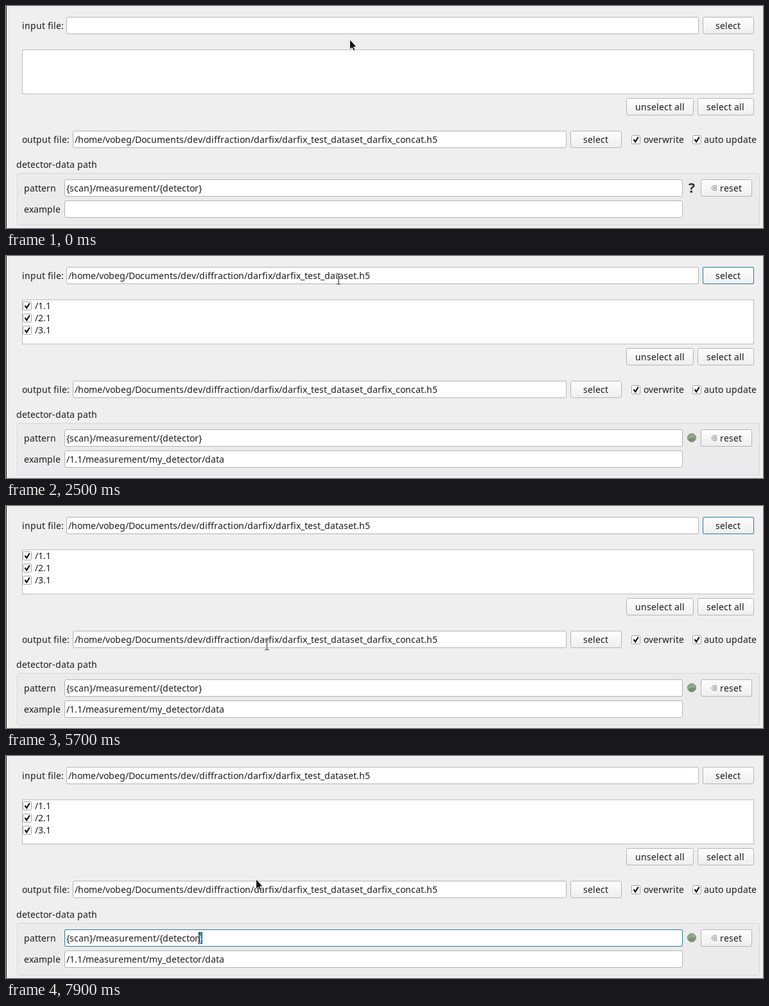
An HTML page that plays this animation: 1179 px wide and 347 px high, repeating every 8 s.

```html
<!DOCTYPE html>
<html lang="en">
<head>
<meta charset="utf-8">
<title>Concatenate scans</title>
<style>
  html, body { margin: 0; width: 100%; height: 100%; overflow: hidden; background: #efefef; }
  svg { display: block; }
  text {
    font: 14px "Noto Sans", "Open Sans", sans-serif;
    font-variant-ligatures: none;
    font-kerning: none;
    fill: #1c1c1c;
    white-space: pre;
  }
  .help { font-size: 21px; font-weight: 700; fill: #303030; }
  .edit { fill: #fff; stroke: #b4b4b4; }
  .button { fill: url(#face); stroke: #b4b4b4; }
  .list { fill: #fff; stroke: #bdbdbd; }
  .group { fill: #ebebeb; stroke: #d9d9d9; }
  .check { fill: #fff; stroke: #a2a2a2; }
  .tick { fill: none; stroke: #111; stroke-width: 2.2; }
  .focus { fill: none; stroke: #2b79a3; }
  .caret { fill: #111; }
  .popup { filter: drop-shadow(0 4px 6px rgba(0, 0, 0, .32)); }

  /* 1.25% of the loop is 100 ms */
  .anim { animation: 8s step-end infinite; opacity: 0; }
  .pasted { animation-name: pasted; }
  .offer { animation-name: offer; }
  .loaded { animation-name: loaded; }
  .unloaded { animation-name: unloaded; }
  .inputFocus { animation-name: inputFocus; }
  .selectFocus { animation-name: selectFocus; }
  .patternFocus { animation-name: patternFocus; }
  .caretEmpty { animation-name: caretEmpty; }
  .caretPath { animation-name: caretPath; }
  .caretPattern { animation-name: caretPattern; }
  .selection { animation-name: selection; }
  .ibeam { animation-name: ibeam; }
  .arrow { animation-name: arrow; }
  .pointer { animation: move 8s step-end infinite; }

  @keyframes pasted { 0% { opacity: 0 } 18.75%, 100% { opacity: 1 } }
  @keyframes offer { 0%, 31.25%, 100% { opacity: 0 } 18.75% { opacity: .7 } 20% { opacity: 1 } }
  @keyframes loaded { 0% { opacity: 0 } 31.25%, 100% { opacity: 1 } }
  @keyframes unloaded { 0% { opacity: 1 } 31.25%, 100% { opacity: 0 } }
  @keyframes inputFocus { 0%, 31.25%, 100% { opacity: 0 } 7.5% { opacity: .5 } 8.75% { opacity: 1 } }
  @keyframes selectFocus { 0%, 82.5%, 100% { opacity: 0 } 31.25% { opacity: 1 } 81.25% { opacity: .5 } }
  @keyframes patternFocus { 0% { opacity: 0 } 81.25% { opacity: .5 } 82.5%, 100% { opacity: 1 } }
  @keyframes caretEmpty { 0%, 13.75%, 100% { opacity: 0 } 7.5% { opacity: 1 } }
  @keyframes caretPath { 0%, 27.5%, 100% { opacity: 0 } 18.75% { opacity: 1 } }
  @keyframes caretPattern { 0%, 87.5%, 98.75%, 100% { opacity: 0 } 81.25%, 95% { opacity: 1 } }
  @keyframes selection { 0% { opacity: 0 } 98.75%, 100% { opacity: 1 } }
  @keyframes ibeam {
    0%, 18.75%, 50%, 72.5%, 85%, 100% { opacity: 0 }
    2.5%, 31.25%, 70%, 75% { opacity: 1 }
  }
  @keyframes arrow {
    0%, 18.75%, 50%, 72.5%, 85%, 100% { opacity: 1 }
    2.5%, 31.25%, 70%, 75% { opacity: 0 }
  }
  @keyframes move {
    0% { transform: translate(535px, 52px); animation-timing-function: steps(4) }
    5% { transform: translate(517px, 36px) }
    50% { transform: translate(501px, 53px) }
    56.25% { transform: translate(501px, 53px); animation-timing-function: steps(4) }
    61.25% { transform: translate(454px, 92px) }
    63.75% { transform: translate(454px, 92px); animation-timing-function: steps(9) }
    75% { transform: translate(381px, 279px); animation-timing-function: steps(3) }
    78.75% { transform: translate(379px, 284px) }
    83.75% { transform: translate(379px, 284px); animation-timing-function: steps(3) }
    87.5%, 100% { transform: translate(389px, 192px) }
  }
</style>
</head>
<body>
<svg id="stage" width="1179" height="347" viewBox="0 0 1179 347"></svg>
<script>
  const pen = document.createElement('canvas').getContext('2d');
  pen.font = '14px "Noto Sans", "Open Sans", sans-serif';

  const advance = c => Math.round(pen.measureText(c).width);

  // Every glyph starts on a whole pixel, as in a hinted toolkit.
  function label(x, y, str, style = '') {
    const xs = [...str].map(c => { const at = x; x += advance(c); return at; });
    return `<text x="${xs.join(' ')}" y="${y}" style="${style}">${str}</text>`;
  }

  const box = (kind, x, y, w, h, r = 2) =>
    `<rect class="${kind}" x="${x + .5}" y="${y + .5}" width="${w - 1}" height="${h - 1}" rx="${r}"/>`;

  const edit = (x, y, w, str = '') => box('edit', x, y, w, 27) + label(x + 3, y + 19, str);
  const button = (x, y, w, textX, str) => box('button', x, y, w, 27) + label(textX, y + 19, str);
  const focus = (x, y, w) => box('focus', x, y, w, 27);
  const caret = (x, y) => `<rect class="caret" x="${x}" y="${y}" width="1" height="19"/>`;
  const anim = (name, ...parts) => `<g class="anim ${name}">${parts.join('')}</g>`;

  const check = (x, y, textX, str) =>
    box('check', x, y, 14, 14, 1) +
    `<path class="tick" d="M${x + 3.5} ${y + 6.5}l2.7 3.8 4.6-7.6"/>` +
    label(textX, y + 12, str);

  const folder = '/home/vobeg/Documents/dev/diffraction/darfix/';
  const file = 'darfix_test_dataset';

  const icon =
    '<path d="M104.5 47.5h9l3 3v13h-12z" fill="#eef1f1" stroke="#cdd3d3"/>' +
    '<rect x="105" y="51" width="9" height="10" fill="#4d9dbd"/>' +
    '<path d="M105 61v-4l3-2 3 3 3-1v4z" fill="#4f8f86"/>' +
    '<circle cx="111" cy="54" r="1.5" fill="#d5e9ee"/>';

  const eraser =
    '<path d="M1098.5 284.5l3-4h5v8h-5z" fill="#d9d9d9" stroke="#a6a6a6"/>' +
    '<path d="M1102 283l3 3m0-3l-3 3" stroke="#8c8c8c"/>';

  const status =
    '<circle cx="1068" cy="284" r="6.5" fill="#91a98b" stroke="#7b8577"/>' +
    '<path d="M1062.5 286q5-3 11-1.500a5.600 5.600 0 0 1-11 1.500z" fill="#759070"/>';

  document.getElementById('stage').innerHTML = [
    `<defs><linearGradient id="face" x2="0" y2="1">
      <stop stop-color="#fefefe"/><stop offset="1" stop-color="#eeeeee"/>
    </linearGradient></defs>`,
    '<rect width="1179" height="347" fill="#efefef"/>',
    '<rect width="1" height="347" fill="#1a1a1a"/>',

    label(25, 36, 'input file:'),
    edit(94, 17, 985),
    button(1085, 17, 80, 1105, 'select'),
    box('list', 25, 68, 1140, 70, 0),
    button(966, 144, 105, 980, 'unselect all'),
    button(1077, 144, 88, 1091, 'select all'),

    label(25, 214, 'output file:'),
    edit(104, 195, 769, folder + file + '_darfix_concat.h5'),
    button(879, 195, 80, 899, 'select'),
    check(974, 202, 993, 'overwrite'),
    check(1069, 202, 1087, 'auto update'),

    label(16, 253, 'detector-data path'),
    box('group', 17, 261, 1157, 82),
    label(28, 290, 'pattern'),
    edit(91, 271, 963, '{scan}/measurement/{detector}'),
    button(1082, 271, 80, 1112, 'reset'),
    eraser,
    label(28, 323, 'example'),
    edit(91, 304, 963),

    anim('unloaded', '<text class="help" x="1063" y="292">?</text>'),
    anim('loaded',
      ...[1, 2, 3].map(n => check(26, 52 + 19 * n, 45, `/${n}.1`)),
      label(94, 323, '/1.1/measurement/my_detector/data'),
      status),

    anim('inputFocus', focus(94, 17, 985)),
    anim('selectFocus', focus(1085, 17, 80)),
    anim('patternFocus', focus(91, 271, 963)),
    anim('pasted', label(97, 36, folder + file + '.h5')),
    anim('caretEmpty', caret(97, 21)),
    anim('caretPath', caret(567, 21)),
    anim('caretPattern', caret(305, 275)),
    anim('selection',
      '<rect x="300" y="275" width="6" height="19" fill="#3184b3"/>',
      label(300, 290, '}', 'fill:#fff'),
      caret(300, 275)),

    anim('offer',
      '<rect class="popup" x="94.500" y="42.500" width="984" height="29" fill="#fff" stroke="#c4c4c4"/>',
      icon,
      label(128, 61, file + '.h5')),

    '<g class="pointer">',
    anim('arrow',
      '<path d="M.5 .5v15.500l3.500-3.200 2.500 5.200 2.300-1-2.400-5.100h4.600z" fill="#111" stroke="#f4f4f4" stroke-width=".8"/>'),
    anim('ibeam',
      '<path d="M-3-8h3l1 1 1-1h3M1-7V7M-3 8h3l1-1 1 1h3" fill="none" stroke="#fff" stroke-width="2.600"/>',
      '<path d="M-2.500-8h2.500l1 1 1-1h2.500M1-7V7M-2.500 8h2.500l1-1 1 1h2.500" fill="none" stroke="#222" stroke-width="1.100"/>'),
    '</g>'
  ].join('');
</script>
</body>
</html>
```
